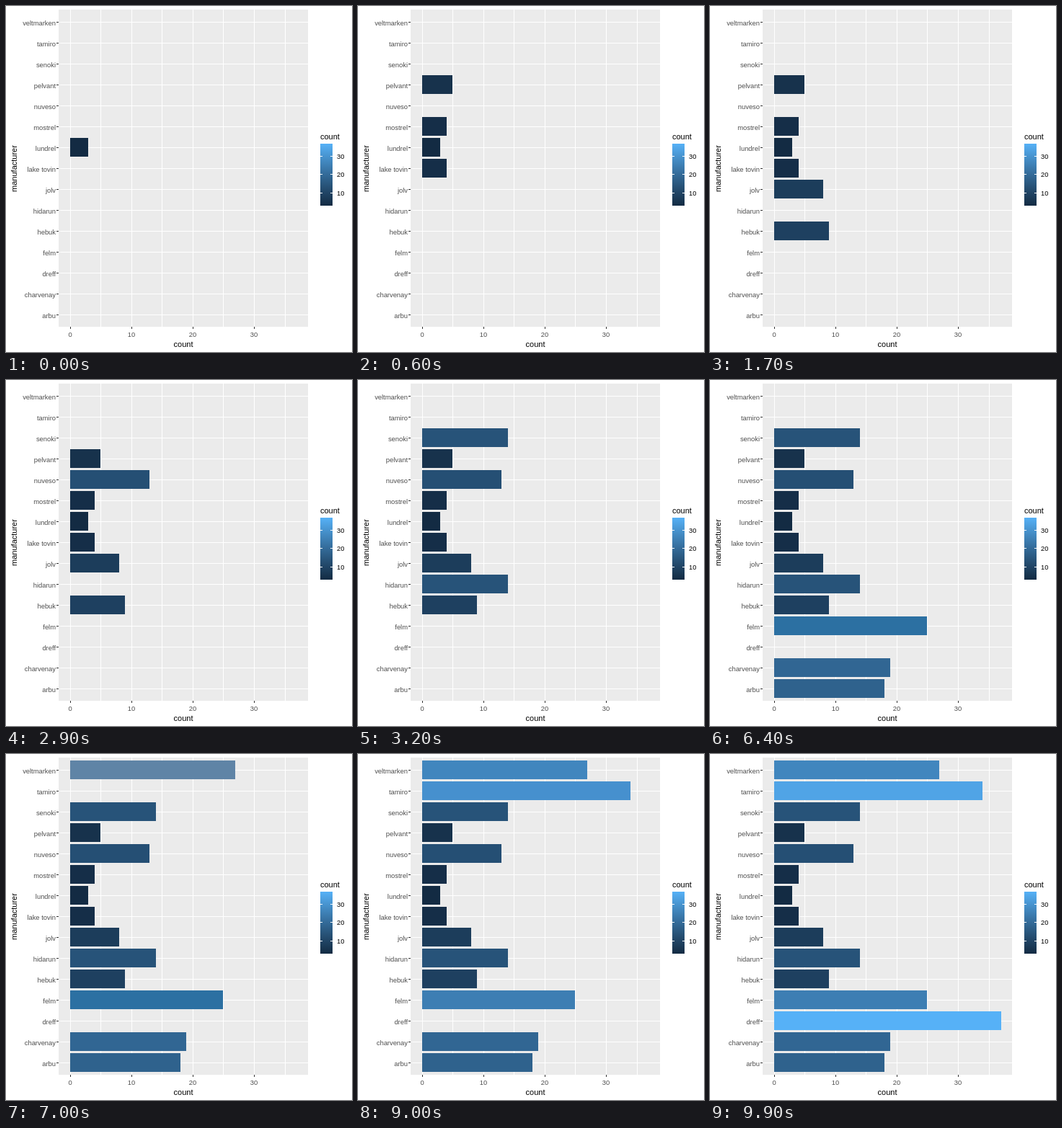
An HTML page for the animation above (10000 ms loop, 480 by 480 pixels).

```html
<!DOCTYPE html>
<html lang="en">
<head>
<meta charset="utf-8">
<title>Bar chart</title>
<style>
  html, body { margin: 0; width: 100%; height: 100%; overflow: hidden; background: #fff; }
  svg { display: block; width: 100%; height: 100%; font-family: "Liberation Sans", Arial, sans-serif; }
  .label { font-size: 9.4px; fill: #4d4d4d; }
  .key { font-size: 9.4px; }
  .title { font-size: 11px; }
</style>
</head>
<body>
<svg id="chart" viewBox="0 0 480 480"></svg>
<script>
const LOOP = 10000;
const PANEL = { left: 73, top: 5, right: 419, bottom: 445 };
const LEGEND = { left: 436, top: 191, width: 17, height: 86 };

// name, count, time of appearance, optional first colour and the time it ends
const rows = [
  ["veltmarken", 27, 7000, "#5f84a6", 9000],
  ["tamiro", 34, 9000, "#4690ce", 9900],
  ["senoki", 14, 3200],
  ["pelvant", 5, 600],
  ["nuveso", 13, 2900],
  ["mostrel", 4, 300],
  ["lundrel", 3, 0],
  ["lake tovin", 4, 300],
  ["jolv", 8, 1500],
  ["hidarun", 14, 3200],
  ["hebuk", 9, 1700],
  ["felm", 25, 6400, "#2c70a2", 9000],
  ["dreff", 37, 9900],
  ["charvenay", 19, 4700],
  ["arbu", 18, 4400]
];

const chart = document.getElementById("chart");
const xOf = count => Math.round(88.73 + 8.508 * count);
const rowY = i => 22 + 29 * i;
const keyY = count => Math.floor(284.7 - 2.54 * count);

function add(tag, attrs, parent = chart) {
  const el = document.createElementNS("http://www.w3.org/2000/svg", tag);
  for (const key in attrs) el.setAttribute(key, attrs[key]);
  parent.append(el);
  return el;
}

const rect = (x, y, width, height, fill) => add("rect", { x, y, width, height, fill });

function text(str, x, y, cls, anchor = "start", more = {}) {
  add("text", { x, y, class: cls, "text-anchor": anchor, ...more }).textContent = str;
}

// Dark to light blue, bent slightly to follow an even lightness ramp
function shade(t) {
  const low = [19, 43, 67], high = [86, 177, 247], bend = [1.5, 4, 5];
  const rgb = low.map((c, i) => Math.round(c + (high[i] - c) * t - bend[i] * 4 * t * (1 - t)));
  return `rgb(${rgb.join(",")})`;
}

function drawPanel() {
  const { left, top, right, bottom } = PANEL;
  rect(left, top, right - left, bottom - top, "#ebebeb");
  for (let n = 0; n <= 35; n += 5) rect(xOf(n), top, 1, bottom - top, "#fff");
  rows.forEach(([name], i) => {
    rect(left, rowY(i), right - left, 1, "#fff");
    rect(left - 3, rowY(i), 3, 1, "#333");
    text(name, 69, rowY(i) + 4.5, "label", "end");
  });
  for (let n = 0; n <= 30; n += 10) {
    rect(xOf(n), bottom, 1, 3, "#333");
    text(n, xOf(n), 459, "label", "middle");
  }
  text("count", 246, 473, "title", "middle");
  text("manufacturer", 0, 0, "title", "middle", { transform: "translate(15 225.5) rotate(-90)" });
}

function drawLegend() {
  const { left, top, width, height } = LEGEND;
  const ramp = add("linearGradient", { id: "ramp", x1: 0, y1: 1, x2: 0, y2: 0 });
  for (let t = 0; t <= 1; t += 0.25) add("stop", { offset: t, "stop-color": shade(t) }, ramp);
  text("count", left, 185, "title");
  rect(left, top, width, height, "url(#ramp)");
  for (const n of [10, 20, 30]) {
    rect(left, keyY(n), 3, 1, "#fff");
    rect(left + width - 3, keyY(n), 3, 1, "#fff");
    text(n, 459, keyY(n) + 4, "key");
  }
}

// Two-state animation that switches hard at the given time
function switchAt(el, prop, before, after, time) {
  el.animate([
    { [prop]: before, offset: 0, easing: "step-end" },
    { [prop]: after, offset: time / LOOP, easing: "step-end" },
    { [prop]: after, offset: 1 }
  ], { duration: LOOP, iterations: Infinity });
}

function drawBars() {
  rows.forEach(([, count, start, early, earlyEnd], i) => {
    const fill = shade((count - 3) / 34);
    const bar = rect(xOf(0), rowY(i) - 13, xOf(count) - xOf(0), 26, fill);
    if (start) switchAt(bar, "opacity", 0, 1, start);
    if (early) switchAt(bar, "fill", early, fill, earlyEnd);
  });
}

drawPanel();
drawLegend();
drawBars();
</script>
</body>
</html>
```
